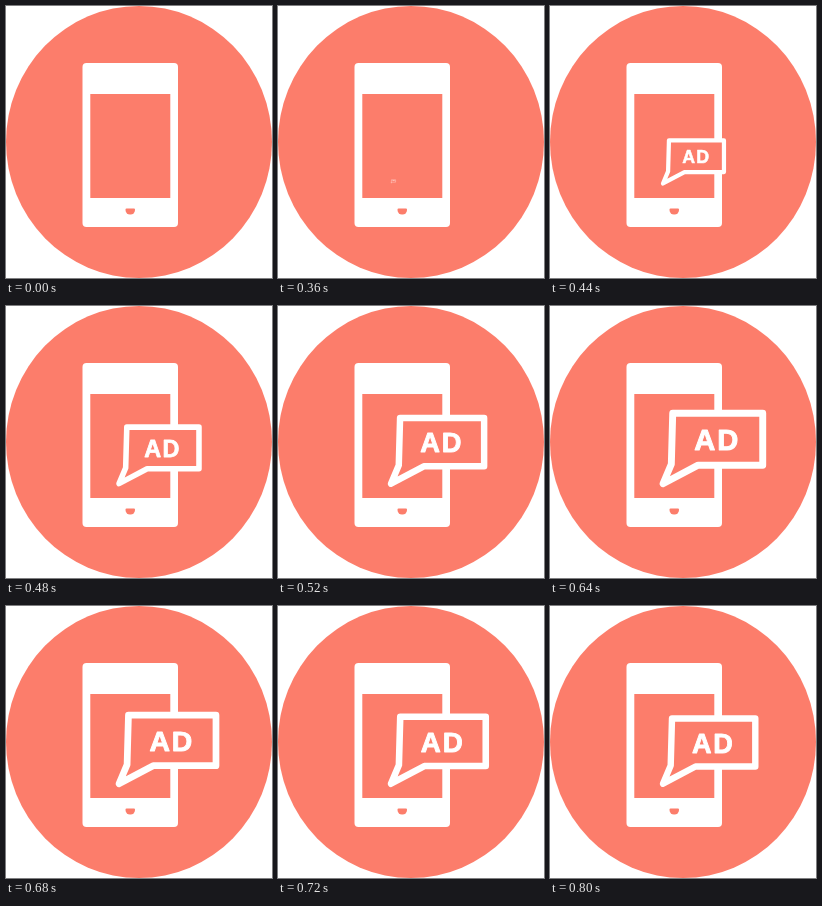
Animation, 266 px wide and 272 px high, one loop 1.92 s. Source, as an HTML page with a canvas:

```html
<!DOCTYPE html>
<html lang="en">
<head>
<meta charset="utf-8">
<title>Phone ad</title>
<style>
  html, body { margin: 0; width: 100%; height: 100%; overflow: hidden; background: #fff; }
  canvas { display: block; }
</style>
</head>
<body>
<canvas id="stage" width="266" height="272"></canvas>
<script>
const ctx = document.getElementById('stage').getContext('2d');
const CORAL = '#fc7d6b', WHITE = '#fff';
const LOOP = 1920, STEP = 40;
const START = 360, PEAK = 600, END = 800;
const TIP = { x: 113, y: 177 };

const easeOut = (u, power) => 1 - Math.pow(1 - u, power);

// Pop up past full size, then settle back
function bubbleScale(t) {
  if (t < START) return 0;
  if (t < PEAK) return 0.05 + 1.065 * easeOut((t - START) / (PEAK - START), 2.1);
  if (t < END) return 1.115 - 0.115 * easeOut((t - PEAK) / (END - PEAK), 1.6);
  return 1;
}

function box(x, y, w, h, r, color) {
  ctx.fillStyle = color;
  ctx.beginPath();
  ctx.roundRect(x, y, w, h, r);
  ctx.fill();
}

function drawPhone() {
  box(76.5, 57, 95.5, 164, 4, WHITE);
  box(84.3, 88, 80, 104, 0, CORAL);
  box(119.5, 202.5, 9.5, 6, [1, 1, 4.5, 4.5], CORAL);
}

function drawBubble(scale) {
  ctx.save();
  ctx.translate(TIP.x, TIP.y);
  ctx.scale(scale, scale);
  ctx.translate(-TIP.x, -TIP.y);
  ctx.lineJoin = 'round';

  ctx.beginPath();
  ctx.moveTo(122, 112.5);
  ctx.lineTo(205.3, 112.5);
  ctx.lineTo(205.3, 160.5);
  ctx.lineTo(145.5, 160.5);
  ctx.lineTo(113, 177.7);
  ctx.lineTo(120.7, 159.5);
  ctx.closePath();
  ctx.fillStyle = CORAL;
  ctx.fill();
  ctx.strokeStyle = WHITE;
  ctx.lineWidth = 6.4;
  ctx.stroke();

  ctx.font = 'bold 27px "Liberation Sans", Arial, sans-serif';
  ctx.fillStyle = WHITE;
  ctx.lineWidth = 0.9;
  for (const [letter, x] of [['A', 142], ['D', 163.3]]) {
    ctx.fillText(letter, x, 146.7);
    ctx.strokeText(letter, x, 146.7);
  }
  ctx.restore();
}

function draw(t) {
  ctx.fillStyle = WHITE;
  ctx.fillRect(0, 0, 266, 272);
  ctx.fillStyle = CORAL;
  ctx.beginPath();
  ctx.ellipse(133, 136, 133, 136, 0, 0, Math.PI * 2);
  ctx.fill();
  drawPhone();
  const scale = bubbleScale(t);
  if (scale > 0) drawBubble(scale);
}

const begin = performance.now();
function tick() {
  const t = (performance.now() - begin) % LOOP;
  draw(Math.floor(t / STEP) * STEP);
  requestAnimationFrame(tick);
}
tick();
</script>
</body>
</html>
```
